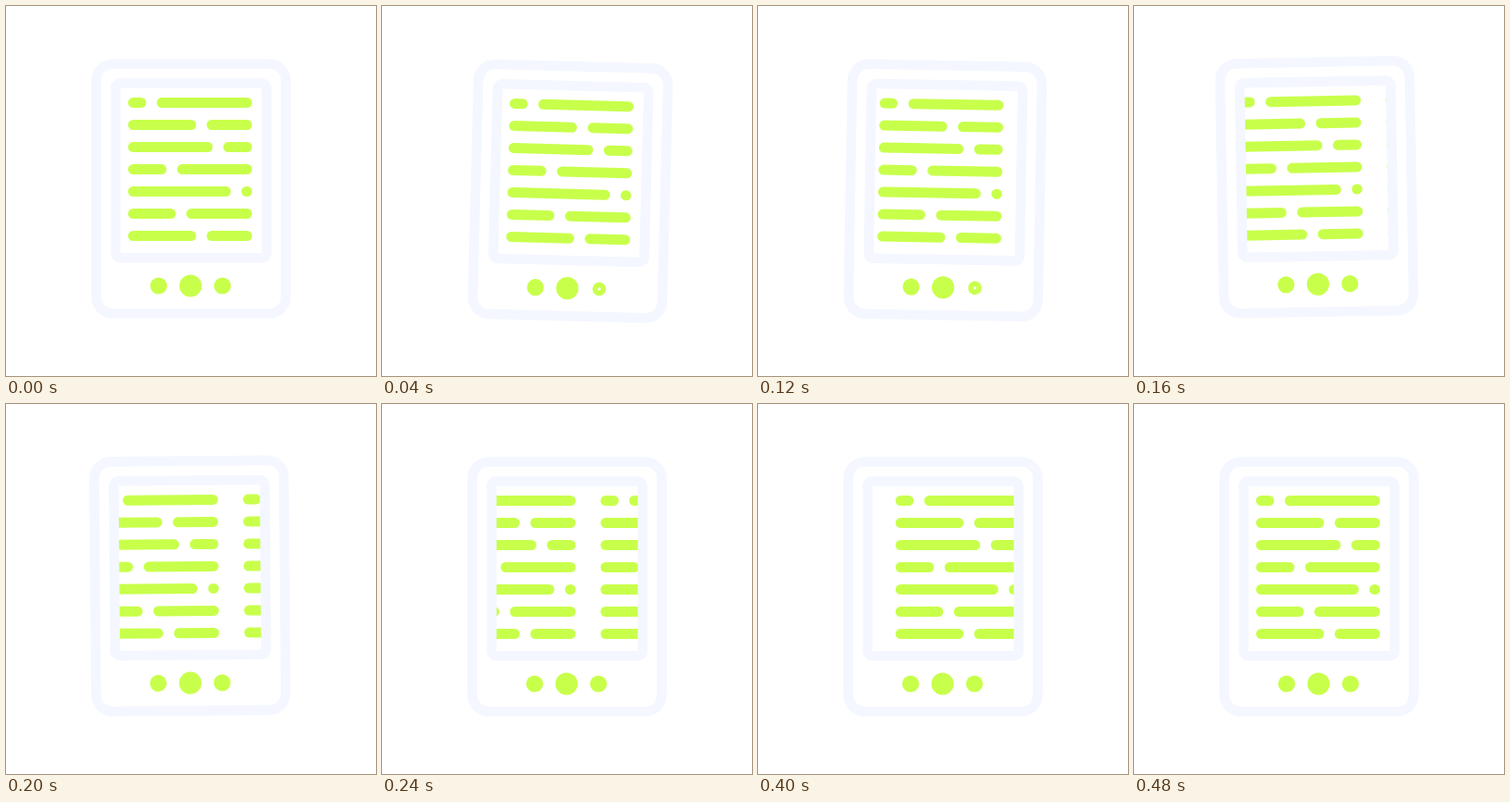
Recreate the animation shown at these times as an HTML page with a canvas. Size 400 by 400 pixels, loop 570 ms.

```html
<!DOCTYPE html>
<html lang="en">
<head>
<meta charset="utf-8">
<title>E-reader page turn</title>
<style>
  html, body { margin: 0; height: 100%; overflow: hidden; background: #fff; }
  canvas { display: block; }
</style>
</head>
<body>
<canvas id="stage" width="400" height="400"></canvas>
<script>
const ctx = document.getElementById('stage').getContext('2d');
const LOOP = 570, STEP = 40, END = 480;
const FRAME = '#f4f7ff', INK = '#c8ff4b';
const PAGE_SHIFT = 161;
// x where the gap begins in each line of text
const GAPS = [151.5, 205.5, 223.5, 173.5, 243, 183.5, 205.5];

// Eased interpolation through [time, value] keys
function track(t, keys) {
  for (let i = 1; i < keys.length; i++) {
    const [t0, a] = keys[i - 1], [t1, b] = keys[i];
    if (t <= t1) {
      const u = Math.max(0, (t - t0) / (t1 - t0));
      return a + (b - a) * u * u * (3 - 2 * u);
    }
  }
  return keys[keys.length - 1][1];
}

function frame(x, y, w, h, r) {
  ctx.strokeStyle = FRAME;
  ctx.lineWidth = 10.6;
  ctx.beginPath();
  ctx.roundRect(x, y, w, h, r);
  ctx.stroke();
}

function bar(left, right, y) {
  ctx.beginPath();
  ctx.roundRect(left, y - 5.5, right - left, 11, 5.5);
  ctx.fill();
}

function page(x) {
  GAPS.forEach((gap, i) => {
    const y = 104.5 + i * 24;
    bar(x + 132, x + gap, y);
    bar(x + gap + 11.5, x + 266, y);
  });
}

// A ring whose stroke fills its middle when weight equals the radius
function dot(x, radius, weight = radius) {
  ctx.strokeStyle = INK;
  ctx.lineWidth = weight + (weight === radius ? 0.2 : 0);
  ctx.beginPath();
  ctx.arc(x, 302.5, radius / 2, 0, Math.PI * 2);
  ctx.stroke();
}

function draw(t) {
  const angle = track(t, [[0, 0], [80, 3], [160, -1], [240, 0]]);
  const scroll = track(t, [[80, 0], [END, PAGE_SHIFT]]);
  const press = track(t, [[0, 9], [80, 2.2], [160, 9]]);

  ctx.fillStyle = '#fff';
  ctx.fillRect(0, 0, 400, 400);
  ctx.save();
  ctx.translate(100, 335);
  ctx.rotate(angle * Math.PI / 180);
  ctx.translate(-100, -335);

  ctx.save();
  ctx.beginPath();
  ctx.rect(119, 84, 163, 188);
  ctx.clip();
  ctx.fillStyle = INK;
  page(-scroll);
  page(PAGE_SHIFT - scroll);
  ctx.restore();

  frame(97.5, 62.5, 205, 270, 18);
  frame(118.5, 83.5, 163.3, 188.8, 5.5);
  dot(165, 9);
  dot(199.5, 12);
  dot(234, 9, press);
  ctx.restore();
}

function tick() {
  const t = performance.now() % LOOP;
  draw(Math.min(END, Math.floor(t / STEP) * STEP));
  requestAnimationFrame(tick);
}
tick();
</script>
</body>
</html>
```
